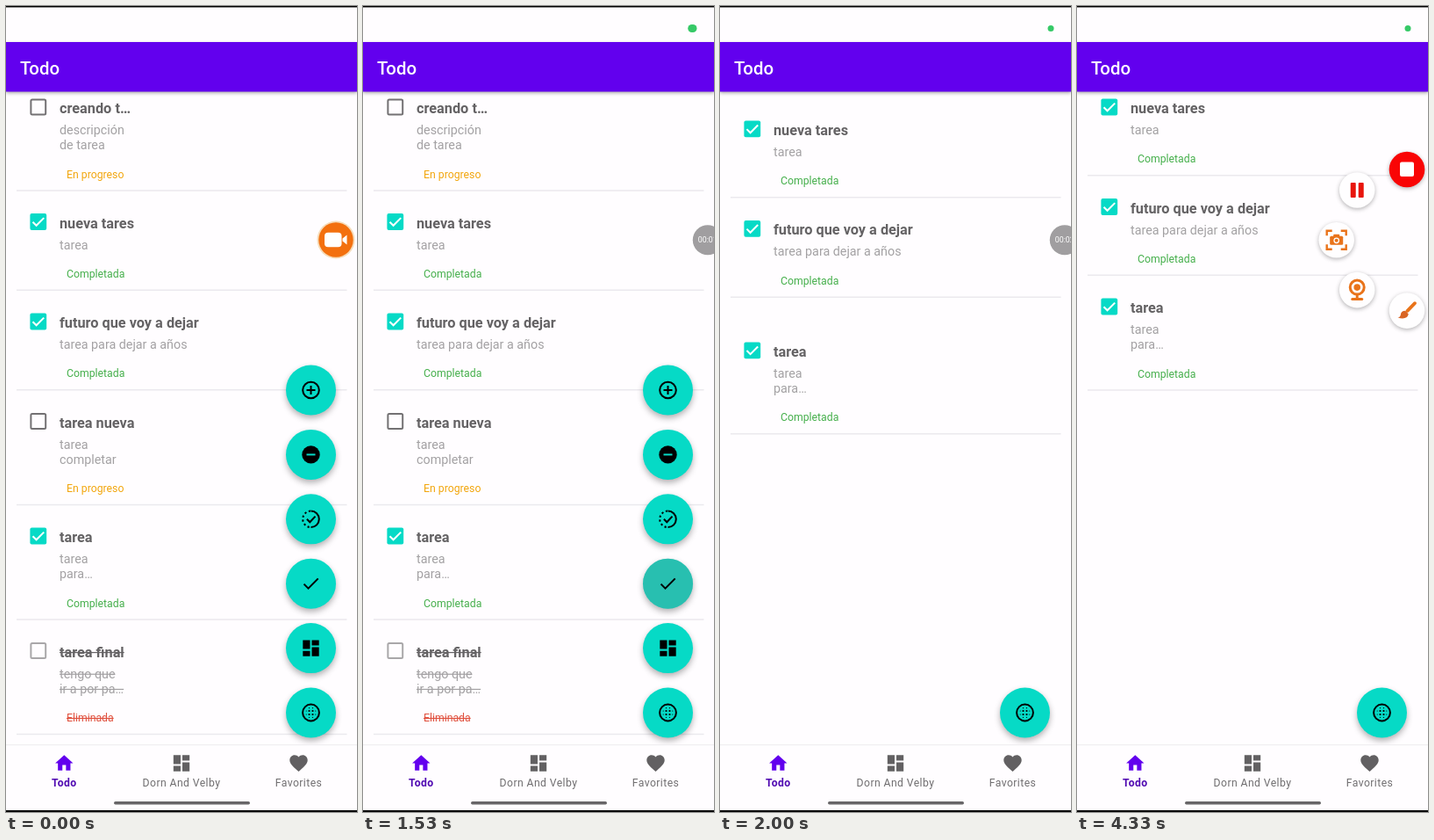
These frames come from a looping animation (400x917 px, 4400 ms). An HTML page with a canvas:

```html
<!DOCTYPE html>
<html lang="es">
<head>
<meta charset="utf-8">
<title>Todo</title>
<style>
html, body { margin: 0; width: 100%; height: 100%; overflow: hidden; background: #fffdff; }
canvas { display: block; width: 400px; height: 917px; }
</style>
</head>
<body>
<canvas id="stage" width="400" height="917"></canvas>
<script>
const ctx = document.getElementById('stage').getContext('2d');
const LOOP = 4400, TICK = 200 / 3;
const PAPER = '#fffdff', TEAL = '#06dac6', PURPLE = '#6200ee', ORANGE = '#e9731a';
const TAU = Math.PI * 2;

const ICONS = {
  home: new Path2D('M10 20v-6h4v6h5v-8h3L12 3 2 12h3v8z'),
  board: new Path2D('M3 13h8V3H3zM3 21h8v-6H3zM13 21h8V11h-8zM13 3v6h8V3z'),
  heart: new Path2D('M12 21.35l-1.45-1.32C5.4 15.36 2 12.28 2 8.5 2 5.42 4.42 3 7.5 3c1.74 0 3.41.81 4.5 2.09C13.09 3.81 14.76 3 16.5 3 19.58 3 22 5.42 22 8.5c0 3.78-3.4 6.86-8.55 11.54z')
};

const STATUS = {
  progress: { label: 'En progreso', color: '#f2a60d' },
  done: { label: 'Completada', color: '#45af4b' },
  removed: { label: 'Eliminada', color: '#e0513f' }
};

const TASKS = [
  { y: 116, title: 'creando t…', lines: ['descripción', 'de tarea'], status: 'progress' },
  { y: 246.5, end: 116, title: 'nueva tares', lines: ['tarea'], status: 'done' },
  { y: 360, end: 229.5, title: 'futuro que voy a dejar', lines: ['tarea para dejar a años'], status: 'done' },
  { y: 473.5, title: 'tarea nueva', lines: ['tarea', 'completar'], status: 'progress' },
  { y: 604, end: 343, title: 'tarea', lines: ['tarea', 'para…'], status: 'done' },
  { y: 734.5, title: 'tarea final', lines: ['tengo que', 'ir a por pa…'], status: 'removed' }
];

const clamp = v => Math.max(0, Math.min(1, v));
const mix = (a, b, p) => a + (b - a) * p;
const ramp = (t, start, length) => clamp((t - start) / length);
const smooth = p => (1 - Math.cos(p * Math.PI)) / 2;
const easeOut = p => 1 - (1 - p) ** 3;

function rect(x, y, w, h, color, radius = 0) {
  ctx.fillStyle = color;
  ctx.beginPath();
  ctx.roundRect(x, y, w, h, radius);
  ctx.fill();
}

function disc(x, y, r, color) {
  ctx.fillStyle = color;
  ctx.beginPath();
  ctx.arc(x, y, r, 0, TAU);
  ctx.fill();
}

function ring(r, width, color, from = 0, to = TAU, x = 0, y = 0) {
  ctx.strokeStyle = color;
  ctx.lineWidth = width;
  ctx.beginPath();
  ctx.arc(x, y, r, from, to);
  ctx.stroke();
}

function line(width, color, ...points) {
  ctx.strokeStyle = color;
  ctx.lineWidth = width;
  ctx.beginPath();
  points.forEach(([x, y]) => ctx.lineTo(x, y));
  ctx.stroke();
}

function text(label, x, y, font, color, { align = 'left', spacing = 0, strike = false } = {}) {
  ctx.font = font + ' Roboto, sans-serif';
  ctx.textAlign = align;
  ctx.letterSpacing = spacing + 'px';
  ctx.fillStyle = color;
  ctx.fillText(label, x, y);
  if (strike) {
    const size = parseFloat(font.split(' ')[1]);
    ctx.fillRect(x, y - size * 0.34, ctx.measureText(label).width, 1.2);
  }
}

function icon(name, x, y, color) {
  ctx.save();
  ctx.translate(x, y);
  ctx.scale(1.02, 1.02);
  ctx.translate(-12, -12);
  ctx.fillStyle = color;
  ctx.fill(ICONS[name]);
  ctx.restore();
}

// Runs a drawing with its own origin, scale and opacity.
function group(x, y, scale, alpha, draw) {
  if (alpha <= 0) return;
  ctx.save();
  ctx.translate(x, y);
  ctx.scale(scale, scale);
  ctx.globalAlpha *= alpha;
  draw();
  ctx.restore();
}

function shadowDisc(r, color, blur, drop, strength) {
  ctx.save();
  ctx.shadowColor = `rgba(0,0,0,${strength})`;
  ctx.shadowBlur = blur;
  ctx.shadowOffsetY = drop;
  disc(0, 0, r, color);
  ctx.restore();
}

function checkbox(y, status) {
  const x = 36.8;
  if (status === 'done') {
    rect(x - 9.4, y - 9.4, 18.8, 18.8, TEAL, 2);
    line(2, '#fff', [x - 6.3, y + 0.2], [x - 2.2, y + 4.3], [x + 6.4, y - 4.4]);
    return;
  }
  ctx.strokeStyle = status === 'removed' ? '#a9a7a9' : '#737173';
  ctx.lineWidth = 2;
  ctx.beginPath();
  ctx.roundRect(x - 8.4, y - 8.4, 16.8, 16.8, 1.5);
  ctx.stroke();
}

function task({ title, lines, status }, y) {
  const extra = (lines.length - 1) * 17.2;
  const strike = status === 'removed';
  const { label, color } = STATUS[status];
  checkbox(y - 1, status);
  text(title, 61, y + 6, '700 16.3px', '#646264', { strike });
  lines.forEach((part, i) => text(part, 61, y + 30 + i * 17.2, '400 14.3px', '#a3a1a3', { strike }));
  text(label, 69, y + 62.3 + extra, '400 12.25px', color, { strike });
  rect(12, y + 76 + extra, 376.5, 1.5, '#ebe9ee');
}

function list(t) {
  const gone = smooth(ramp(t, 1640, 120));
  const shift = smooth(ramp(t, 1822, 250));
  ctx.save();
  ctx.beginPath();
  ctx.rect(0, 97, 400, 744);
  ctx.clip();
  for (const item of TASKS) {
    const stays = item.end !== undefined;
    ctx.globalAlpha = stays ? 1 : 1 - gone;
    task(item, stays ? mix(item.y, item.end, shift) : item.y);
  }
  ctx.restore();
}

const FAB_ICONS = [
  () => {
    ring(9.3, 2, '#000');
    line(2, '#000', [-5, 0], [5, 0]);
    line(2, '#000', [0, -5], [0, 5]);
  },
  () => {
    disc(0, 0, 10.2, '#000');
    line(2, TEAL, [-5, 0], [5, 0]);
  },
  () => {
    ring(9.3, 2, '#000', -TAU / 4, TAU / 4);
    ctx.setLineDash([2.2, 2.7]);
    ring(9.3, 2, '#000', TAU / 4 + 0.2, TAU * 0.75);
    ctx.setLineDash([]);
    line(2, '#000', [-4.6, 0], [-1.2, 3.4], [5, -3.2]);
  },
  () => line(2, '#000', [-8, 0.4], [-3, 5.4], [8.2, -5.8]),
  () => icon('board', 0, 0, '#000'),
  () => {
    ring(9.4, 2, '#000');
    for (const x of [-2, 2]) for (const y of [-2, 2]) disc(x, y, 1.1, '#000');
    for (const a of [-2, 2]) for (const b of [-5.3, 5.3]) {
      disc(a, b, 0.6, '#000');
      disc(b, a, 0.6, '#000');
    }
  }
];

function fabs(t) {
  const pressed = ramp(t, 1400, 200);
  FAB_ICONS.forEach((glyph, i) => {
    const fixed = i === 5;
    const p = fixed ? 0 : ramp(t, 1554 + i * 40, 200);
    const scale = 1 - p / 2;
    const y = 437 + i * 73.4 + (1 - scale) * 36.7 * (i + 1);
    group(347.5, y, scale, 1 - p * p, () => {
      shadowDisc(28.5, TEAL, 7, 3.5, 0.3);
      if (i === 3) disc(0, 0, 28.5, `rgba(120,130,126,${0.45 * pressed})`);
      glyph();
    });
  });
}

function navigation() {
  rect(0, 841, 400, 76, PAPER);
  rect(0, 840, 400, 1.2, '#f0eef1');
  const tabs = [['home', 'Todo', 66.3, PURPLE, '#510bb2', 700],
    ['board', 'Dorn And Velby', 200, '#626062', '#706e70', 400],
    ['heart', 'Favorites', 333.5, '#626062', '#706e70', 400]];
  for (const [name, label, x, tint, ink, weight] of tabs) {
    icon(name, x, 861.5, tint);
    text(label, x, 888, weight + ' 12.2px', ink, { align: 'center', spacing: 0.42 });
  }
  rect(123, 905, 155, 3.4, '#686668', 1.7);
}

function appBar() {
  rect(0, 0, 400, 41, PAPER);
  ctx.save();
  ctx.shadowColor = 'rgba(0,0,0,.35)';
  ctx.shadowBlur = 4;
  ctx.shadowOffsetY = 1.5;
  rect(0, 41, 400, 56.5, PURPLE);
  ctx.restore();
  text('Todo', 16, 77.5, '500 20.4px', '#fff');
}

function micPill(t) {
  const shown = ramp(t, 500, 200);
  const shrink = smooth(ramp(t, 1330, 270));
  const x = mix(365.5, 377, shrink), w = mix(30, 7, shrink), h = mix(22, 7, shrink);
  group(x, 25.5, 1, shown, () => {
    rect(-w / 2, -h / 2, w, h, '#36c967', h / 2);
    ctx.globalAlpha *= clamp(1 - shrink * 2);
    rect(-1.8, -5.8, 3.6, 7, '#fff', 1.8);
    ring(3.6, 1.1, '#fff', 0, Math.PI, 0, -0.6);
    line(1.2, '#fff', [0, 3], [0, 5.4]);
  });
}

function timerLabel(t) {
  const seconds = [1130, 1660, 2860].filter(start => t >= start).length;
  return '00:0' + seconds;
}

function bubble(t) {
  const swap = ramp(t, 340, 190);
  const rest = ramp(t, 930, 130);
  const hide = ramp(t, 3200, 65);
  const x = mix(376, 392.8, ramp(t, 930, 195));
  group(376, 266, 1, 1 - swap, () => {
    disc(0, 0, 21.5, '#f6dcb9');
    disc(0, 0, 19.7, '#f3700f');
    rect(-13, -8.3, 19.5, 16.6, '#fff', 4);
    ctx.beginPath();
    ctx.moveTo(7.5, -1.5);
    ctx.lineTo(12.5, -5.5);
    ctx.lineTo(12.5, 5.5);
    ctx.lineTo(7.5, 1.5);
    ctx.fill();
  });
  group(x, 266.3, mix(1, 0.83, rest), swap * (1 - hide), () => {
    const tone = Math.round(mix(75, 160, rest));
    disc(0, 0, 20.5, `rgb(${tone},${tone - 2},${tone})`);
    text(timerLabel(t), 0, 3.8, '400 10.6px', '#fff', { align: 'center' });
  });
}

const TOOLS = [
  () => rect(-8, -8.5, 16, 16.5, '#fff', 2),
  () => {
    rect(-7.5, -8.5, 6, 17, '#e8150c', 1);
    rect(1.5, -8.5, 6, 17, '#e8150c', 1);
  },
  () => {
    for (const sx of [-1, 1]) for (const sy of [-1, 1])
      line(2.4, ORANGE, [sx * 11, sy * 5], [sx * 11, sy * 10.5], [sx * 5, sy * 10.5]);
    rect(-7.5, -4.5, 15, 10, ORANGE, 1.5);
    rect(-3.5, -6.5, 7, 3, ORANGE, 1);
    ring(2.7, 1.3, '#fff', 0, TAU, 0, 0.5);
  },
  () => {
    ring(8, 3, ORANGE, 0, TAU, 0, -3);
    disc(0, -3, 3.8, ORANGE);
    rect(-1.5, 5, 3, 5, ORANGE);
    rect(-7, 8.8, 14, 3, ORANGE, 1.5);
  },
  () => {
    ctx.lineCap = 'round';
    line(3.8, ORANGE, [0.5, 0.2], [9, -8.4]);
    ctx.lineCap = 'butt';
    ctx.fillStyle = '#d96524';
    ctx.beginPath();
    ctx.moveTo(-1.8, 0.2);
    ctx.quadraticCurveTo(-7, 0.2, -7.2, 5);
    ctx.quadraticCurveTo(-8, 8, -10.5, 8);
    ctx.quadraticCurveTo(0, 11, 1.8, 4);
    ctx.fill();
  }
];

function toolMenu(t) {
  const open = easeOut(ramp(t, 3200, 130));
  TOOLS.forEach((glyph, i) => {
    const angle = -TAU / 4 - i * TAU / 8;
    const x = 376 + 80.3 * open * Math.cos(angle);
    const y = 266.3 + 80.3 * open * Math.sin(angle);
    group(x, y, mix(0.5, 1, open), open, () => {
      shadowDisc(20.3, i ? '#fffeff' : '#f90505', 5, 1.5, 0.3);
      glyph();
    });
  });
}

function draw(t) {
  rect(0, 0, 400, 917, PAPER);
  list(t);
  fabs(t);
  navigation();
  appBar();
  micPill(t);
  bubble(t);
  toolMenu(t);
  rect(0, 0, 400, 1.6, '#000');
  rect(0, 915, 400, 2, '#000');
}

function frame() {
  const t = performance.now() % LOOP;
  draw(Math.floor((t + 4) / TICK) % 66 * TICK);
  requestAnimationFrame(frame);
}
frame();
</script>
</body>
</html>
```
